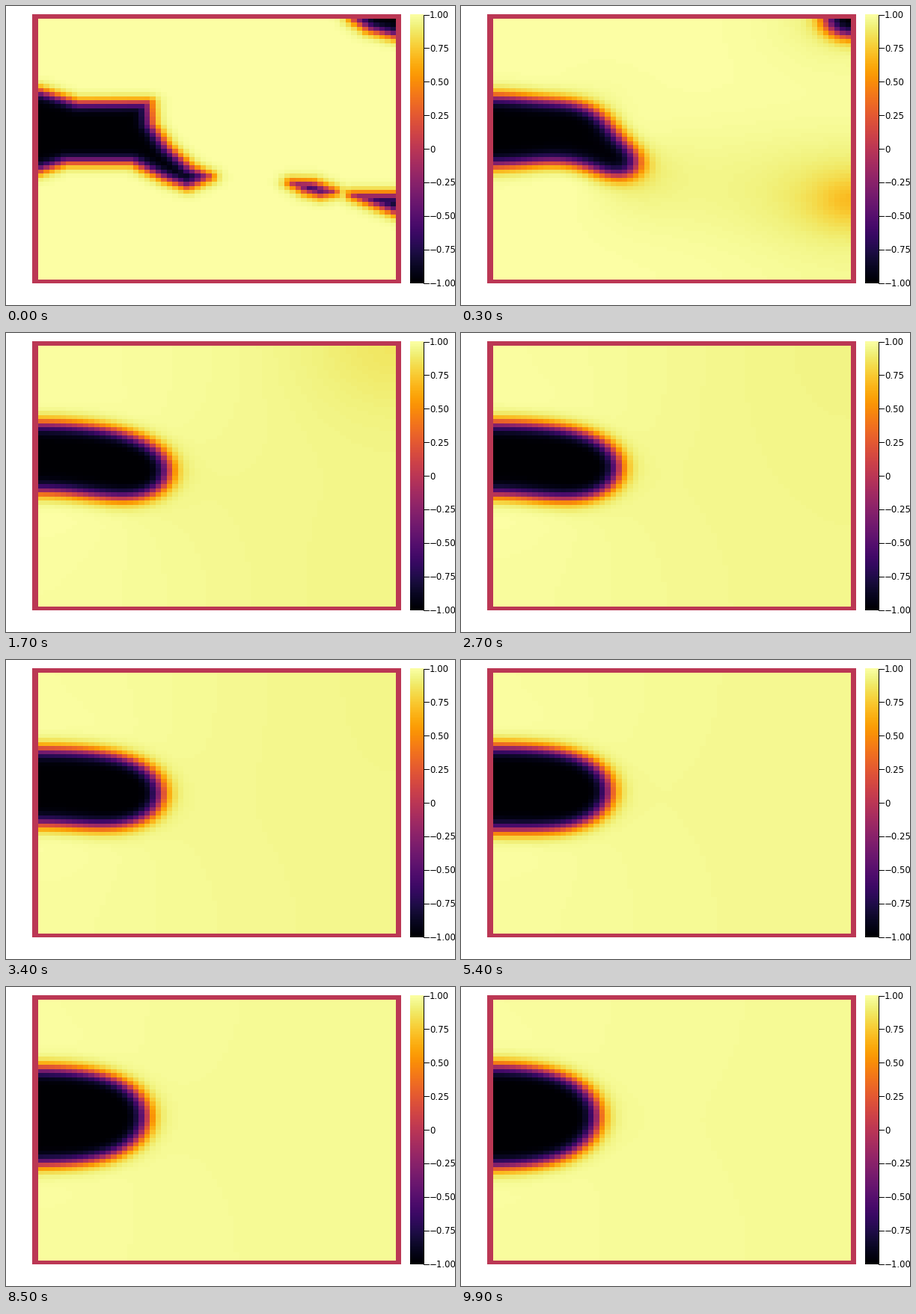
These frames come from a looping animation (600 by 400 pixels, 10000 ms). A matplotlib script:

```python
import numpy as np
import matplotlib.pyplot as plt
from matplotlib.animation import FuncAnimation

W, H, DPI = 600, 400, 100
INTERVAL, FRAMES = 100, 100
LEFT, RIGHT, TOP, BOTTOM = 35, 528, 11, 371   # heatmap including its border cells
N = 64                                        # interior cells per side
EPS2 = 1.7                                    # squared interface width, in cells
DT, SUBSTEPS = 0.125, 100
EDGE = 1.45                                   # initial edge softness, in cells

# Dark regions at the start, as polygons in stage pixels.
REGIONS = [
    [(-200, 113), (43, 113), (95, 129.5), (190, 129), (193, 158), (215, 189),
     (245, 216), (271, 228), (242, 241), (215, 231), (168, 208), (80, 208),
     (43, 220), (-200, 220)],
    [(381, 236), (410, 237), (438, 248), (420, 252), (400, 247)],
    [(700, 252.5), (462, 252.5), (485, 262), (521, 276), (700, 276)],
    [(464, -200), (464, 17), (485, 31), (521, 40), (700, 40), (700, -200)],
]


def signed_distance(polygon):
    """Distance of each cell centre to a polygon, negative inside, in cells."""
    x, y = np.meshgrid(np.arange(N) + 0.5, np.arange(N) + 0.5)
    size = np.array([RIGHT - LEFT, BOTTOM - TOP]) / (N + 2)
    points = (np.array(polygon) - (LEFT, TOP)) / size - 1
    nearest = np.full(x.shape, np.inf)
    inside = np.zeros(x.shape, bool)
    for (ax, ay), (bx, by) in zip(points, np.roll(points, -1, axis=0)):
        dx, dy = bx - ax, by - ay
        s = np.clip(((x - ax) * dx + (y - ay) * dy) / (dx * dx + dy * dy), 0, 1)
        nearest = np.minimum(nearest, np.hypot(x - ax - s * dx, y - ay - s * dy))
        if ay != by:
            inside ^= ((ay > y) != (by > y)) & (x < ax + (y - ay) * dx / dy)
    return np.where(inside, -nearest, nearest)


def simulate(u):
    """Cahn-Hilliard flow with closed walls, semi-implicit in cosine space."""
    k = np.arange(N)
    dct = np.sqrt(2 / N) * np.cos(np.pi * k[:, None] * (k + 0.5) / N)
    dct[0] /= np.sqrt(2)
    wave = 2 - 2 * np.cos(np.pi * k / N)
    k2 = wave[:, None] + wave
    damping = 1 / (1 + DT * k2 * (2 + EPS2 * k2))
    history = [u]
    for _ in range(FRAMES - 1):
        for _ in range(SUBSTEPS):
            u_hat = dct @ u @ dct.T
            force = dct @ (u ** 3 - 3 * u) @ dct.T
            u = dct.T @ ((u_hat - DT * k2 * force) * damping) @ dct
        history.append(u)
    return history


def to_pixels(u):
    """Add the zero-valued border and enlarge the cells to whole pixels."""
    cells = np.pad(u, 1)
    rows = np.arange(BOTTOM - TOP) * (N + 2) // (BOTTOM - TOP)
    cols = np.arange(RIGHT - LEFT) * (N + 2) // (RIGHT - LEFT)
    return np.clip(cells, -1, 1)[np.ix_(rows, cols)]


distance = np.min([signed_distance(r) for r in REGIONS], axis=0)
states = simulate(np.tanh(distance / EDGE))

fig = plt.figure(figsize=(W / DPI, H / DPI), dpi=DPI, facecolor="white")
ax = fig.add_axes([0, 0, 1, 1])
style = dict(cmap="inferno", vmin=-1, vmax=1, interpolation="nearest", aspect="auto")
heat = ax.imshow(to_pixels(states[0]), extent=(LEFT, RIGHT, BOTTOM, TOP), **style)
ax.imshow(np.linspace(1, -1, 256)[:, None], extent=(540, 558, BOTTOM, TOP), **style)

ax.plot([558, 558], [TOP + 0.5, BOTTOM], color="black", lw=0.72)
for value in np.linspace(-1, 1, 9):
    y = TOP + 0.5 + (1 - value) / 2 * (BOTTOM - TOP - 0.5)
    label = f"{value:.2f}".replace("-", "\u2212") if value else "0"
    ax.plot([558, 565], [y, y], color="black", lw=0.72)
    ax.text(566, y + 4.3, label, family="DejaVu Sans", size=8.5, va="baseline")

ax.set_xlim(0, W)
ax.set_ylim(H, 0)
ax.axis("off")


def update(frame):
    # Once the flow has slowed, the picture refreshes only every third step.
    shown = frame if frame < 36 else frame - frame % 3
    heat.set_data(to_pixels(states[shown]))
    return [heat]


anim = FuncAnimation(fig, update, frames=FRAMES, interval=INTERVAL,
                     repeat=True, repeat_delay=0, blit=False)
plt.show()
```
